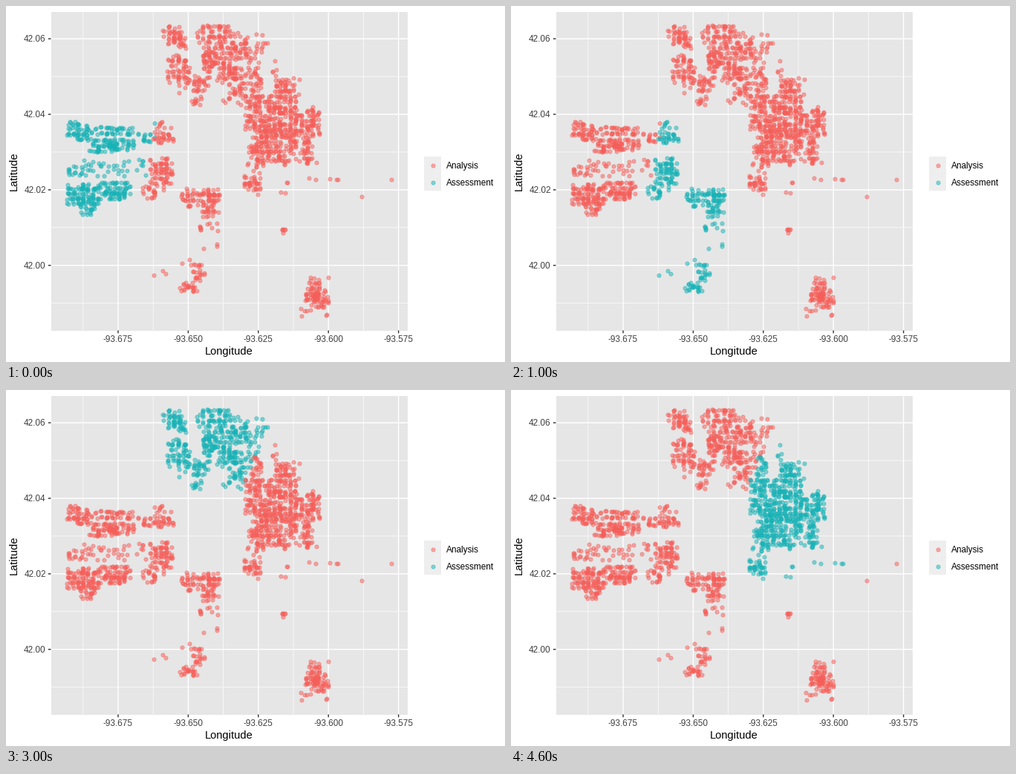
A matplotlib script that plays this animation: 672 by 480 pixels, repeating every 5000 ms.

```python
import numpy as np
import matplotlib.pyplot as plt
from matplotlib.animation import FuncAnimation
from matplotlib.patches import Rectangle

W, H, DPI = 672, 480, 96
RED, TEAL = "#F65F5A", "#17B3B7"
LEFT, TOP, RIGHT, BOTTOM = 60.5, 7.5, 541, 437.5
plt.rcParams["font.family"] = "Liberation Sans"
rng = np.random.default_rng(12)


def lon(v):
    return 434.2 + (v + 93.6) * 3776


def lat(v):
    return 349.7 - (v - 42) * 5092


def streets(x0, y0, x1, y1, density):
    """Scatter homes along the streets of one block."""
    n = max(2, round((x1 - x0) * (y1 - y0) * density))
    p = rng.uniform((x0, y0), (x1, y1), (n, 2))
    for axis, (a, b) in enumerate(((x0, x1), (y0, y1))):
        gap = (b - a) / max(1, round((b - a) / 7))
        lane = a + np.round((p[:, axis] - a) / gap) * gap
        on_lane = np.arange(n) % 2 == axis
        p[on_lane, axis] = lane[on_lane] + rng.normal(0, 0.5, on_lane.sum())
    return p


def region(density, blocks, thin=(), homes=()):
    parts = [streets(*b, density) for b in blocks]
    parts += [streets(*b, 0.022) for b in thin]
    return np.vstack(parts + [np.reshape(homes, (-1, 2))])


# Blocks are x0, y0, x1, y1; homes are x, y.
west = region(
    0.09,
    [(84, 156, 97, 173), (96, 160, 115, 180), (121, 164, 171, 173),
     (110, 181, 146, 196), (134, 180, 171, 193), (178, 173, 194, 183),
     (85, 217, 102, 227), (83, 240, 124, 266), (101, 266, 119, 281),
     (127, 238, 166, 260)],
    [(104, 208, 165, 229), (170, 207, 191, 220)],
    [(82, 174), (200, 158), (200, 177), (188, 228)])

south = region(
    0.073,
    [(199, 173, 225, 184), (194, 206, 223, 239), (184, 243, 200, 259),
     (237, 247, 287, 269), (265, 271, 286, 284), (233, 373, 258, 385),
     (255, 359, 267, 372)],
    [(200, 157, 225, 187), (198, 236, 226, 248), (261, 286, 285, 302),
     (237, 342, 267, 362)],
    [(284, 321), (284, 324), (266, 327), (199, 363), (211, 357), (215, 361),
     (262, 301), (262, 302)])

southeast = region(
    0.07,
    [(372, 301, 376, 306), (372, 301, 376, 306), (404, 365, 422, 396),
     (413, 384, 434, 406)],
    [(397, 388, 433, 418)],
    [(519, 234), (478.5, 256.5), (434, 366), (398, 418), (375, 302), (373, 306)])

north = region(
    0.064,
    [(212, 28, 241, 51), (218, 66, 246, 103), (258, 27, 302, 48),
     (266, 49, 281, 88), (266, 66, 280, 88), (283, 50, 322, 70),
     (285, 70, 316, 104), (253, 96, 280, 114), (300, 104, 322, 124),
     (247, 122, 262, 133)],
    [(222, 40, 248, 60), (233, 103, 242, 117), (300, 36, 352, 64),
     (316, 62, 342, 104)],
    [(292, 127), (295, 130), (312, 130), (316, 133), (254, 94)])

east = region(
    0.074,
    [(363, 92, 382, 122), (331, 91, 343, 122), (322, 122, 354, 168),
     (354, 122, 390, 174), (390, 140, 421, 175), (330, 170, 390, 196),
     (338, 196, 382, 214), (400, 177, 412, 212), (321, 224, 342, 247)],
    [(359, 74, 369, 92), (380, 98, 394, 122), (384, 180, 402, 212),
     (326, 190, 340, 224), (370, 238, 383, 252), (404, 232, 418, 235)],
    [(338.5, 254), (418, 211), (413, 136), (436, 233), (445, 234), (447, 234)])

regions = [west, south, southeast, north, east]

fig = plt.figure(figsize=(W / DPI, H / DPI), dpi=DPI, facecolor="white")
ax = fig.add_axes([0, 0, 1, 1])
ax.set(xlim=(0, W), ylim=(H, 0))
ax.axis("off")


def box(x, y, w, h, color):
    ax.add_patch(Rectangle((x, y), w, h, fc=color, lw=0, zorder=0))


def line(xs, ys, color, width):
    ax.plot(xs, ys, color=color, lw=width * 72 / DPI, solid_capstyle="butt",
            zorder=1, snap=False)


def dots(xy, color):
    return ax.scatter(xy[:, 0], xy[:, 1], s=15.2, lw=0.7, color=color,
                      alpha=0.5, zorder=2)


def label(x, y, text, size=8.8, color="black", ha="center", **kw):
    ax.text(x, y, text, size=size, color=color, ha=ha, **kw)


box(LEFT, TOP, RIGHT - LEFT, BOTTOM - TOP, "#E6E6E6")

for v in np.arange(-93.6875, -93.58, 0.025):
    line([lon(v)] * 2, [TOP, BOTTOM], "white", 0.71)
for v in np.arange(41.99, 42.06, 0.02):
    line([LEFT, RIGHT], [lat(v)] * 2, "white", 0.71)
for v in np.arange(-93.675, -93.57, 0.025):
    x = lon(v)
    line([x, x], [TOP, BOTTOM], "white", 1.42)
    line([x, x], [BOTTOM, BOTTOM + 3.7], "#333333", 1.42)
    label(x, 453, f"{v:.3f}", color="#404040", va="baseline")
for v in np.arange(42, 42.07, 0.02):
    y = lat(v)
    line([LEFT, RIGHT], [y, y], "white", 1.42)
    line([LEFT - 3.7, LEFT], [y, y], "#333333", 1.42)
    label(53.8, y + 4.2, f"{v:.2f}", color="#404040", ha="right", va="baseline")

label(300.5, 470, "Longitude", size=11, va="baseline")
label(18, 222.5, "Latitude", size=11, rotation=90, ha="right", va="center")

for y, name, color in ((214.6, "Analysis", RED), (237.7, "Assessment", TEAL)):
    box(563, y - 11.5, 23, 23.1, "#EEEEEE")
    dots(np.array([[574.5, y]]), color)
    label(593.3, y + 4.2, name, ha="left", va="baseline")

clouds = [dots(xy, RED) for xy in regions]


def update(i):
    for k, cloud in enumerate(clouds):
        cloud.set_color(TEAL if k == i else RED)
    return clouds


anim = FuncAnimation(fig, update, frames=len(regions), interval=1000,
                     repeat=True, repeat_delay=0, blit=False)
plt.show()
```
